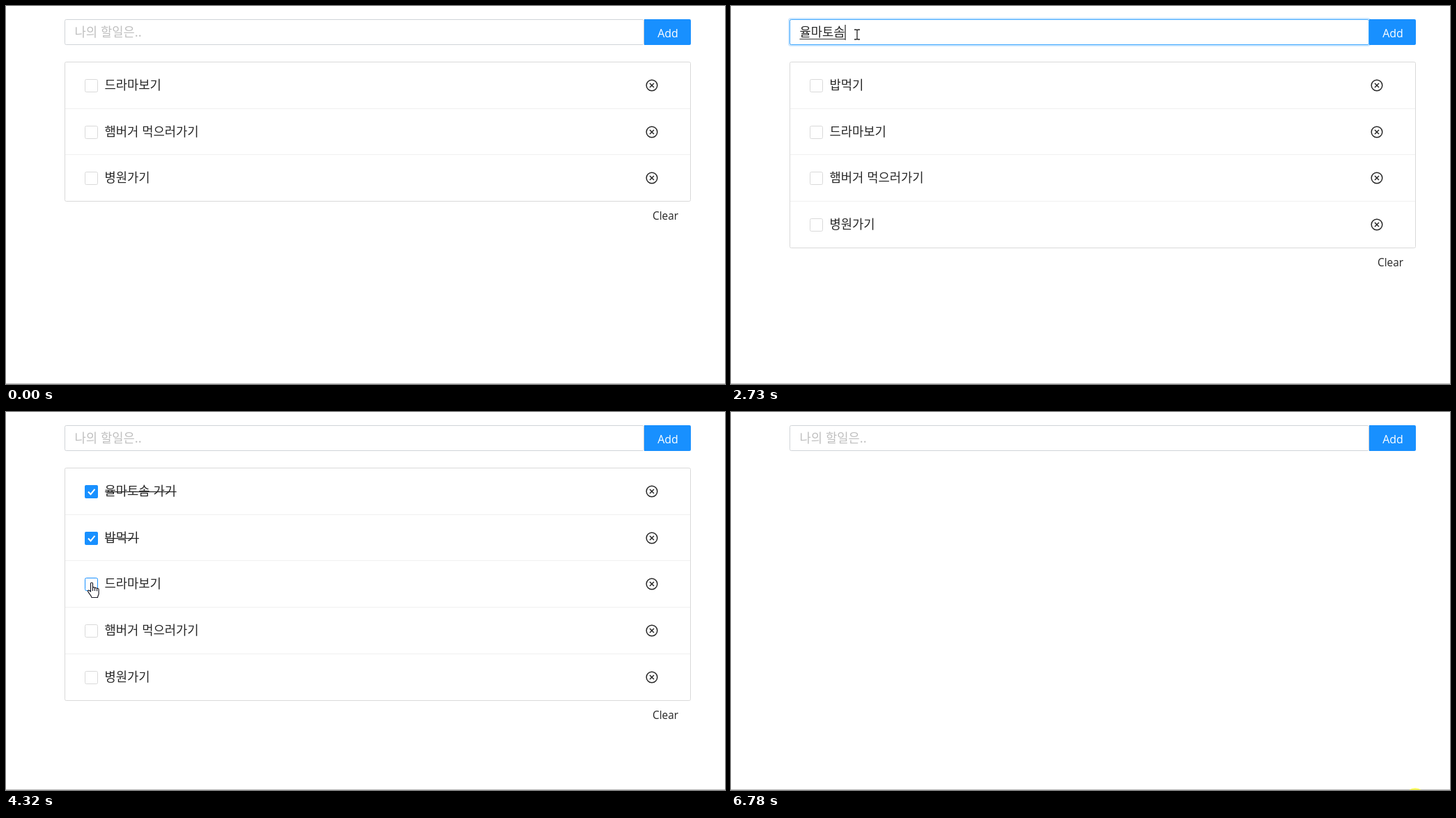
An HTML page for the animation above (6.81 s loop, 1032 px wide and 543 px high).

```html
<!DOCTYPE html>
<html lang="ko">
<head>
<meta charset="utf-8">
<title>Todo</title>
<style>
  html, body { margin: 0; width: 100%; height: 100%; overflow: hidden; background: #fff; }
  svg { display: block; width: 1032px; height: 543px; }
  text { font: 350 17.7px "Noto Sans CJK KR", "Noto Sans CJK", sans-serif; fill: #262626; white-space: pre; }
  .latin { font-family: "Open Sans", "Noto Sans", sans-serif; font-weight: 400; text-anchor: middle; }
  .line { fill: none; stroke: #262626; }
  .pointer { fill: #fff; stroke: #1c1c28; stroke-width: 1.2; stroke-linejoin: round; }
</style>
</head>
<body>
<svg id="stage" viewBox="0 0 1032 543">
  <rect y="542" width="1032" height="1" fill="#b8b8b8"/>
  <path d="M916 19h65q2 0 2 2v33q0 2-2 2h-65z" fill="#1890ff"/>
  <text class="latin" x="950" y="45" style="font-size:16px;fill:#fff">Add</text>

  <rect x="84.5" y="19.5" width="831" height="36" rx="2" fill="#fff" stroke="#d0d4d8"/>
  <g id="focus">
    <rect x="83" y="18" width="834" height="39" rx="3" fill="none" stroke="#1890ff" stroke-opacity=".22" stroke-width="2"/>
    <rect x="84.5" y="19.5" width="831" height="36" rx="2" fill="none" stroke="#40a9ff"/>
  </g>
  <text id="hint" x="98.5" y="44" style="fill:#bfbfbf">나의 할일은..</text>
  <text id="entry" x="98.5" y="44"></text>
  <rect id="underline" y="47" height="1" fill="#333"/>
  <rect id="caret" y="27" width="1.2" height="22" fill="#222"/>

  <g id="list">
    <rect id="frame" x="84.5" y="80.5" width="898" rx="2" fill="none" stroke="#d9d9d9"/>
    <g id="rows"></g>
    <rect id="clearHover" x="910" width="73" height="38" rx="2" fill="#000" fill-opacity=".018"/>
    <text id="clear" class="latin" x="946.5" style="font-size:15.4px">Clear</text>
  </g>

  <circle id="flash" r="14" fill="#ff0" fill-opacity=".58"/>
  <g id="cursor">
    <path id="arrow" class="pointer" d="M0 0V16l3.7-3.5 2.4 5.5 2.2-1-2.4-5.4H11z"/>
    <g id="hand">
      <path class="pointer" d="M-1.5 13V1.5a1.5 1.5 0 0 1 3 0V8c0-2 3-1.6 3 .4c.4-1.4 3-1.2 3 .6c.6-1.2 2.6-.6 2.6 1V16c0 2-1.4 3-1.6 5.5H0c-.4-2.5-3-4.5-5.3-8.5c-.8-1.6 1-2.4 2-1.4z"/>
      <path class="pointer" d="M1.5 8v4M4.5 8.5v3.5M7.5 9.2v3"/>
    </g>
    <path id="beam" class="line" stroke-width="1.3" d="M-4-7h3l1 1 1-1h3M0-6V6M-4 7h3l1-1 1 1h3"/>
  </g>
</svg>
<script>
const LOOP = 6810, PITCH = 66.7, BLINK = 240;
const $ = id => document.getElementById(id);
const clamp = v => Math.max(0, Math.min(1, v));
const show = (el, on) => { el.style.display = on ? '' : 'none'; };
const set = (el, attrs) => { for (const k in attrs) el.setAttribute(k, attrs[k]); };
const within = (t, spans) => spans.some(([a, b]) => t >= a && t < b);

const FIRST = '밥먹기', SECOND = '율마토솜 가기';
const BASE = ['드라마보기', '햄버거 먹으러가기', '병원가기'];
const ADDED = [1860, 3060], CHECKED = [3795, 4155, 4410];
const FOCUS = 480, BLUR = 3780, CLEARED = 6150;
const CLICKS = [[450, 510], [3740, 3800], [4110, 4190], [4380, 4440], [6120, 6180], [6780, LOOP]];
const HIDDEN = [[0, 30], [6180, 6480], [6600, LOOP]];

// Input states as the syllables are composed: [time, text]
const typed = [[1110, 'ㅂ'], [1140, '바']];
['밥', '밥ㅁ', '밥머', '밥먹', '밥먹ㄱ', FIRST].forEach((s, i) => typed.push([1410 + 60 * i, s]));
typed.push([ADDED[0], '']);
['ㅇ', '유', '율', '욞', '율마', '율맡', '율마토', '율마톳', '율마토소', '율마토솜',
 '율마토솜 ', '율마토솜 ㄱ', '율마토솜 가', '율마토솜 각', SECOND]
  .forEach((s, i) => typed.push([2310 + 46 * i, s]));
typed.push([ADDED[1], '']);

// Pointer route: [time, x, y]
const ROUTE = [
  [30, 512, 456], [430, 181, 41], [3500, 181, 41], [3730, 123, 108], [3930, 123, 108],
  [4080, 123, 176], [4190, 123, 176], [4290, 123, 245], [4490, 123, 245], [4650, 500, 362],
  [4770, 820, 330], [4860, 955, 162], [5060, 930, 118], [5650, 930, 118], [5820, 916, 270],
  [5975, 946, 429], [6180, 946, 429], [6470, 941, 442], [6600, 964, 543], [6780, 982, 554]
];

function slope(i, axis) {
  const a = ROUTE[i - 1], b = ROUTE[i], c = ROUTE[i + 1];
  const resting = p => p[1] === b[1] && p[2] === b[2];
  if (!a || !c || resting(a) || resting(c)) return 0;
  return (c[axis] - a[axis]) / (c[0] - a[0]);
}

function pointerAt(t) {
  const next = ROUTE.findIndex(p => p[0] > t);
  if (next === 0) return ROUTE[0].slice(1);
  if (next < 0) return ROUTE[ROUTE.length - 1].slice(1);
  const a = ROUTE[next - 1], b = ROUTE[next], span = b[0] - a[0], u = (t - a[0]) / span;
  return [1, 2].map(k => {
    const ease = u * u * (3 - 2 * u);
    return a[k] + (b[k] - a[k]) * ease
      + span * u * (1 - u) * (slope(next - 1, k) * (1 - u) - slope(next, k) * u);
  });
}

const rows = Array.from({ length: 5 }, (_, i) => {
  const g = document.createElementNS('http://www.w3.org/2000/svg', 'g');
  set(g, { transform: `translate(0 ${Math.round(PITCH * i)})` });
  g.innerHTML = `
    ${i ? '<path d="M85 80.5H982" stroke="#f0f0f0"/>' : ''}
    <rect class="box" x="113.5" y="105.5" width="18" height="18" rx="2" fill="#fff"/>
    <g class="tick"><rect x="113" y="105" width="19" height="19" rx="2" fill="#1890ff"/>
      <path d="M118 114.5l3.5 3.7 6-7.4" fill="none" stroke="#fff" stroke-width="2"/></g>
    <text x="141.5" y="120"></text>
    <rect class="strike" x="142" y="114" height="1.2" fill="#262626"/>
    <rect class="hover" x="900" y="95" width="53" height="38" rx="2" fill="#000" fill-opacity=".018"/>
    <circle class="line" cx="927" cy="114" r="7.8" stroke-width="1.5"/>
    <path class="line" d="M924 111l6 6m0-6l-6 6" stroke-width="1.5"/>`;
  $('rows').append(g);
  const part = s => g.querySelector(s);
  return { g, box: part('.box'), tick: part('.tick'), label: part('text'), strike: part('.strike'), hover: part('.hover') };
});

function renderInput(t) {
  const state = typed.filter(s => s[0] <= t).pop() || [FOCUS, ''];
  const text = state[1], entry = $('entry');
  entry.textContent = text;
  show($('hint'), !text);
  const width = n => n ? entry.getSubStringLength(0, n) : 0;
  const end = width(text.length), start = width(text.lastIndexOf(' ') + 1);
  set($('underline'), { x: 98.5 + start, width: end - start });
  set($('caret'), { x: 98.3 + end });
  const lit = text || Math.floor((t - state[0]) / BLINK) % 2 === 0;
  show($('caret'), t >= FOCUS && t < BLUR && lit);
  $('focus').style.opacity = clamp((t - FOCUS) / 120) * clamp((BLUR + 120 - t) / 120);
}

function renderList(t, x, y, pointing) {
  show($('list'), t < CLEARED);
  const items = [...BASE];
  if (t >= ADDED[0]) items.unshift(FIRST);
  if (t >= ADDED[1]) items.unshift(SECOND);
  const height = Math.round(PITCH * items.length), bottom = 80.5 + height;
  set($('frame'), { height });
  set($('clear'), { y: bottom + 26.5 });
  set($('clearHover'), { y: bottom + .5 });

  let hot = false;
  rows.forEach((row, i) => {
    const used = i < items.length;
    show(row.g, used);
    if (!used) return;
    const dy = Math.abs(y - 114 - PITCH * i);
    const onLabel = pointing && x > 112 && x < 245 && dy < 14;
    const onDelete = pointing && x > 900 && x < 953 && dy < 19;
    const progress = items.length === 5 && CHECKED[i] ? clamp((t - CHECKED[i]) / 90) : 0;
    row.label.textContent = items[i];
    row.tick.style.opacity = progress;
    set(row.box, { stroke: onLabel ? '#1890ff' : '#d9d9d9' });
    set(row.strike, { width: progress ? row.label.getComputedTextLength() : 0 });
    show(row.hover, onDelete);
    hot = hot || onLabel || onDelete;
  });
  const onClear = pointing && x > 910 && x < 983 && y > bottom && y < bottom + 38;
  show($('clearHover'), onClear);
  return t < CLEARED && (hot || onClear);
}

function render(t) {
  const [x, y] = pointerAt(t);
  const pointing = !within(t, HIDDEN);
  renderInput(t);
  const hot = renderList(t, x, y, pointing);
  const overInput = x > 84 && x < 916 && y > 19 && y < 56;
  show($('cursor'), pointing);
  show($('hand'), hot);
  show($('beam'), !hot && overInput);
  show($('arrow'), !hot && !overInput);
  set($('cursor'), { transform: `translate(${x.toFixed(1)} ${y.toFixed(1)})` });
  set($('flash'), { cx: x, cy: y });
  show($('flash'), within(t, CLICKS));
}

const begin = performance.now();
function tick() {
  render((performance.now() - begin) % LOOP);
  requestAnimationFrame(tick);
}
tick();
</script>
</body>
</html>
```
